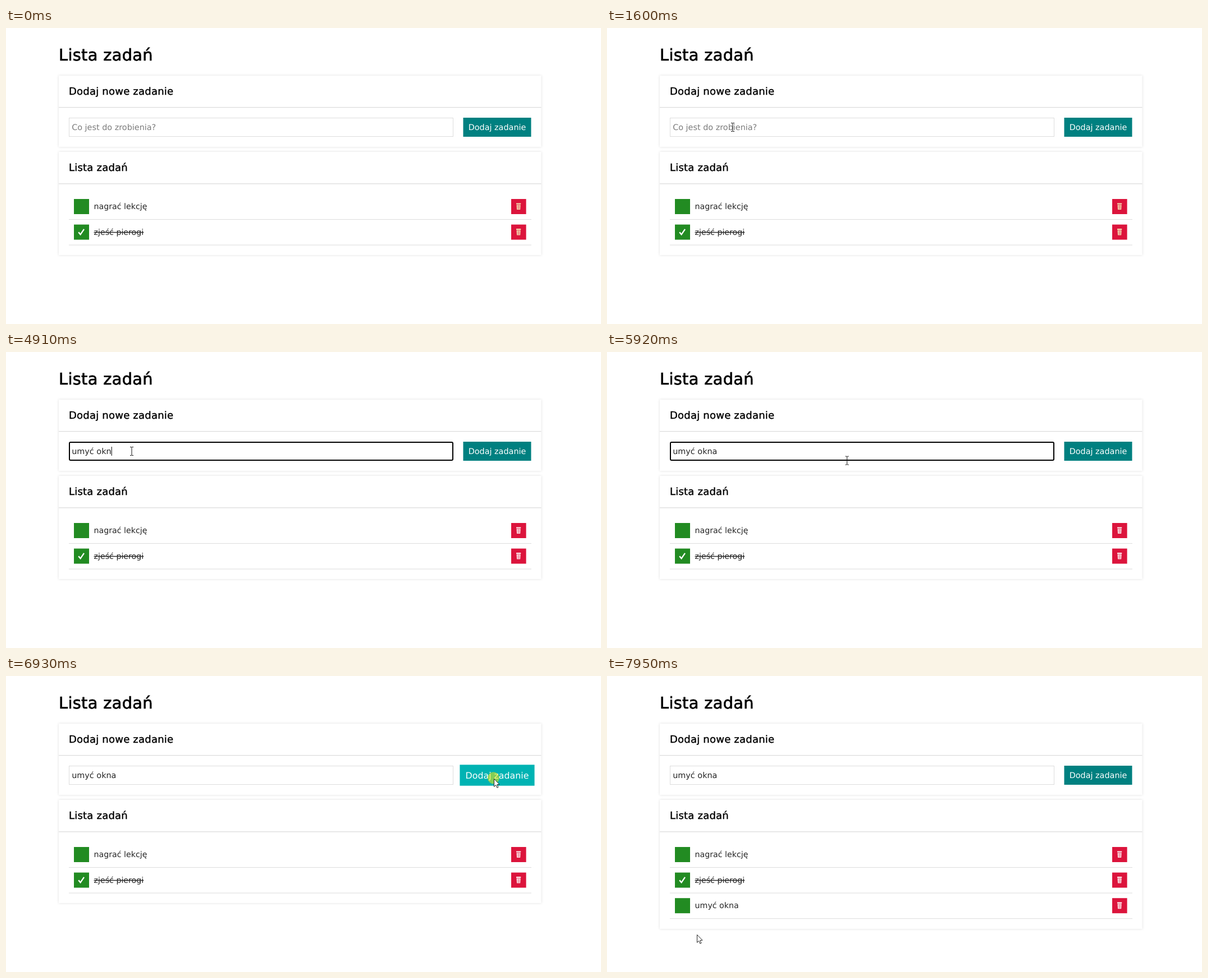
An HTML page for the animation above (8 s loop, 1060 by 528 pixels).

```html
<!DOCTYPE html>
<html lang="pl">
<head>
<meta charset="utf-8">
<title>Lista zadań</title>
<style>
  html, body { margin: 0; width: 100%; height: 100%; overflow: hidden; background: #fff; }
  svg { display: block; width: 1060px; height: 528px; }
  text { font: 14.4px "DejaVu Sans", sans-serif; text-rendering: geometricPrecision; white-space: pre; fill: #262626; }
  .head { fill: #000; stroke: #000; letter-spacing: .012em; }
  .h1 { font-size: 28.8px; stroke-width: .7px; }
  .h2 { font-size: 18px; stroke-width: .4px; }
  .item { font-size: 14.2px; }
  .done { text-decoration: line-through; }
  .hint { fill: #7b7b7b; }
  .panel { fill: #fff; filter: drop-shadow(0 0 2.2px #ddd); }
  .line { fill: #ddd; }
</style>
</head>
<body>
<svg viewBox="0 0 1060 528">
  <defs>
    <g id="bin">
      <rect width="26.6" height="27" fill="#dc143c"/>
      <path d="M9 7.4h8.2v2.2h-8.2zM9.6 10.4h7l-.5 8.6h-6z"/>
      <path d="M11.8 11.2v7M13.2 11.2v7M14.6 11.2v7" stroke="#dc143c" stroke-width=".5"/>
    </g>
    <rect id="box" width="27" height="27" fill="#228b22"/>
  </defs>

  <text class="head h1" x="94" y="58.2">Lista zadań</text>

  <rect class="panel" x="94" y="85" width="859.5" height="127"/>
  <text class="head h2" x="112" y="119.2">Dodaj nowe zadanie</text>
  <rect class="line" x="94" y="141" width="859.5" height="1.3"/>
  <rect id="field" fill="#fff"/>
  <text id="entry" x="117.2" y="182"></text>
  <rect id="caret" y="169" width="1" height="16"/>
  <g id="button">
    <rect id="face" x="-60.5" y="-17" width="121" height="34"/>
    <text y="5" text-anchor="middle" style="fill:#fff">Dodaj zadanie</text>
  </g>

  <rect id="list" class="panel" x="94" y="221" width="859.5"/>
  <text class="head h2" x="112" y="255.2">Lista zadań</text>
  <rect class="line" x="94" y="277.2" width="859.5" height="1.3"/>
  <g id="rows"></g>

  <circle id="press" r="10.5" fill="#fae600" opacity=".52"/>
  <g id="arrow">
    <path d="M.5 .6V14.4L3.7 11.5L5.8 16.4L8 15.4L5.9 10.7L10 10.3Z" fill="#fff" stroke="#111" stroke-width=".9" stroke-linejoin="round"/>
  </g>
  <path id="beam" d="M-3 -7.5h2.3L0 -6.8L.7 -7.5H3M0 -6.8V6.8M-3 7.5h2.3L0 6.8L.7 7.5H3" fill="none" stroke="#111"/>
</svg>
<script>
const LOOP = 8000;
const $ = id => document.getElementById(id);
const set = (el, attrs) => { for (const k in attrs) el.setAttribute(k, attrs[k]); };
const show = (el, on) => { el.style.display = on ? "" : "none"; };
const clamp = v => Math.max(0, Math.min(1, v));
const ramp = (t, from, span) => clamp((t - from) / span);
const easeOut = u => 1 - (1 - u) ** 2;
const easeInOut = u => u < .5 ? 4 * u ** 3 : 1 - 4 * (1 - u) ** 3;

const TYPED = "umyć okna";
const KEYS = [2730, 2900, 3150, 3430, 3800, 4630, 4740, 4910, 5270];
const FOCUS = 1680, BLUR = 6810, ADDED = 6990;

// Each move advances in even steps along a cubic curve.
const MOVES = [
  { from: 170, to: 470, steps: 6, ease: easeOut, pts: [[1000, 560], [900, 500], [770, 465], [688, 450]] },
  { from: 830, to: 1600, steps: 14, ease: easeInOut, pts: [[688, 450], [560, 410], [250, 320], [224, 177]] },
  { from: 5680, to: 6350, steps: 12, ease: easeInOut, pts: [[224, 177], [700, 200], [1080, 340], [869, 183]] },
  { from: 7340, to: 7950, steps: 10, ease: easeInOut, pts: [[869, 183], [780, 300], [420, 450], [160, 461]] }
];

function bezier(p, u) {
  const v = 1 - u;
  return [0, 1].map(i =>
    v ** 3 * p[0][i] + 3 * v * v * u * p[1][i] + 3 * v * u * u * p[2][i] + u ** 3 * p[3][i]);
}

function pointer(t) {
  const move = MOVES.filter(m => t >= m.from).pop();
  if (!move) return null;
  const step = Math.floor(ramp(t, move.from, move.to - move.from) * (move.steps - 1) + 1e-6);
  return bezier(move.pts, move.ease((step + 1) / move.steps));
}

function row(label, y, done) {
  const tick = done ? '<path d="M129.2 364.2l3.4 4.1L139 358.8" fill="none" stroke="#fff" stroke-width="2.3"/>' : "";
  return `<g><use href="#box" x="121" y="${y}"/>${tick}
    <text class="item${done ? " done" : ""}" x="156.6" y="${y + 18}">${label}</text>
    <use href="#bin" x="900" y="${y}"/>
    <rect class="line" x="112" y="${y + 36}" width="824" height="1"/></g>`;
}

$("rows").innerHTML = row("nagrać lekcję", 305) + row("zjeść pierogi", 350.6, true) + row(TYPED, 396.2);
const newRow = $("rows").lastElementChild;

function drawField(t) {
  const focused = t >= FOCUS && t < BLUR;
  const count = KEYS.filter(k => t >= k).length;
  const entry = $("entry");
  entry.textContent = count ? TYPED.slice(0, count) : "Co jest do zrobienia?";
  entry.setAttribute("class", count ? "" : "hint");
  set($("field"), focused
    ? { x: 113, y: 161, width: 683, height: 32, rx: 2, stroke: "#000", "stroke-width": 2 }
    : { x: 112.5, y: 160.5, width: 684, height: 33, rx: 0, stroke: "#ddd", "stroke-width": 1 });

  const last = count ? KEYS[count - 1] : FOCUS;
  show($("caret"), focused && (t - last) % 1060 < 520);
  $("caret").setAttribute("x", 117.3 + (count ? entry.getComputedTextLength() : 0));
}

function drawButton(t) {
  const hover = ramp(t, 6150, 120) - ramp(t, 7400, 180);
  const active = t >= BLUR && t < ADDED ? (t < 6930 ? .6 : 1) : 0;
  const tone = Math.round(128 + 25.6 * (hover + active));
  $("button").setAttribute("transform", `translate(875 177) scale(${1 + .1 * hover})`);
  $("face").setAttribute("fill", `rgb(0,${tone},${tone})`);
}

function drawPointer(t) {
  const pos = pointer(t);
  const [x, y] = pos || [0, 0];
  const overField = x > 112 && x < 797 && y > 160 && y < 194;
  show($("arrow"), pos && !overField);
  show($("beam"), pos && overField);
  for (const id of ["arrow", "beam"]) $(id).setAttribute("transform", `translate(${x} ${y})`);
  show($("press"), (t >= FOCUS && t < 1720) || (t >= BLUR && t < ADDED));
  set($("press"), { cx: x - .5, cy: y - 1.2 });
}

function draw(t) {
  const added = t >= ADDED;
  drawField(t);
  drawButton(t);
  drawPointer(t);
  show(newRow, added);
  $("list").setAttribute("height", added ? 230 : 184);
  $("rows").setAttribute("fill", t < FOCUS ? "#f3e2b4" : "#fdeff0");
}

function frame() {
  draw(performance.now() % LOOP);
  requestAnimationFrame(frame);
}
frame();
</script>
</body>
</html>
```
